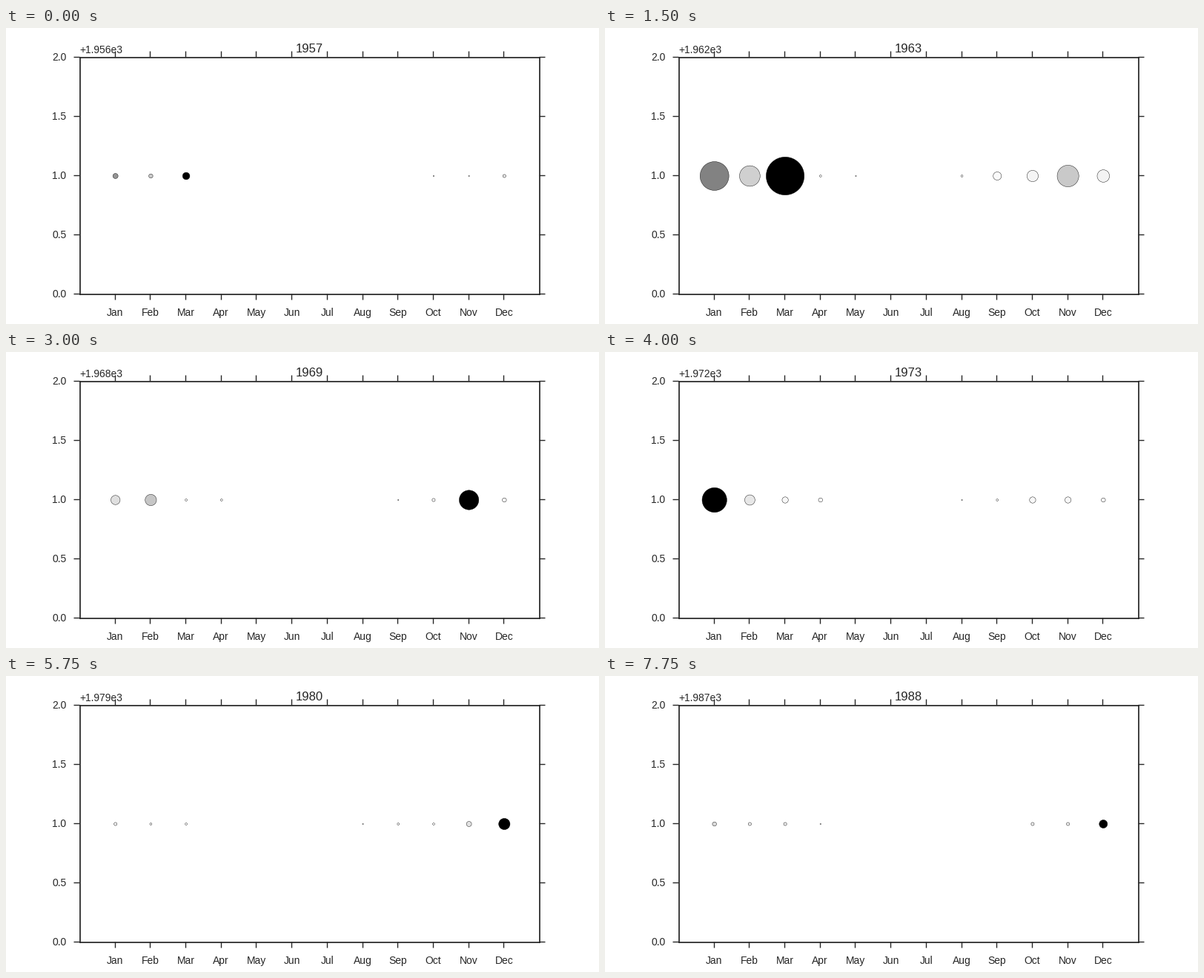
Recreate the animation shown at these times as a matplotlib script. Size 800 by 400 pixels, loop 8 s.

```python
import numpy as np
import matplotlib.pyplot as plt
from matplotlib.animation import FuncAnimation
from matplotlib.transforms import ScaledTranslation

W, H, DPI = 800, 400, 100
START, YEARS, STEP = 1957, 32, 250
INK = "0.15"
MONTHS = "Jan Feb Mar Apr May Jun Jul Aug Sep Oct Nov Dec".split()

# Key years: largest marker and its month, counted from January
KEY_YEARS, KEY_SIZES, KEY_MONTHS = zip(
    (1957, 7, 2), (1961, 18, 3), (1964, 46, 2), (1965, 27, 2),
    (1969, 19, -2), (1973, 24, 0), (1976, 27, -2), (1979, 31, -2),
    (1980, 11, -1), (1984, 27, -2), (1987, 8, -1))

plt.rcParams.update({
    "font.family": "Liberation Sans",
    "font.size": 10,
    "text.color": INK,
    "axes.edgecolor": INK,
    "axes.linewidth": 1.25,
})


def diameters(year):
    """Marker diameters in points: large in winter, none in midsummer."""
    rng = np.random.default_rng(year)
    peak = round(np.interp(year, KEY_YEARS, KEY_SIZES))
    month = round(np.interp(year, KEY_YEARS, KEY_MONTHS))
    season = 0.5 + 0.5 * np.cos(2 * np.pi * (np.arange(12) + 0.5) / 12)
    d = (peak * season * rng.uniform(0.15, 0.85, 12)).astype(int)
    d[month] = peak
    return d


def nudge(artist, dx, dy):
    """Move an artist by pixels, right and up."""
    shift = ScaledTranslation(dx / DPI, dy / DPI, fig.dpi_scale_trans)
    artist.set_transform(artist.get_transform() + shift)


def caption(x, y, **style):
    return fig.text(x / W, 1 - y / H, "", va="baseline", **style)


fig = plt.figure(figsize=(W / DPI, H / DPI), dpi=DPI, facecolor="white")
ax = fig.add_axes([0.125, 0.1, 0.775, 0.8])
ax.set(xlim=(0, 13), ylim=(0, 2))
ax.set_xticks(range(1, 13), MONTHS)
ax.set_yticks(np.arange(0, 2.1, 0.5))
ax.tick_params(length=6, width=1, pad=7, color=INK, labelcolor=INK,
               top=True, right=True)

# Pixel alignment of ticks and their labels
for axis, label_shift in (ax.xaxis, (-0.5, 0)), (ax.yaxis, (-0.5, 1)):
    for tick in axis.get_major_ticks():
        nudge(tick.tick1line, -1, 1)
        nudge(tick.tick2line, -1, 1)
        nudge(tick.label1, *label_shift)

title = caption(409, 33, size=12, ha="center")
offset = caption(99, 34, ha="left")
dots = ax.scatter([1], [1], s=[1], c=[1], cmap="Greys",
                  edgecolors="black", linewidths=0.3)


def draw(i):
    year = START + i
    d = diameters(year)
    months = np.flatnonzero(d)
    area = d[months] ** 2
    dots.set_offsets(np.column_stack([months + 1, np.ones(len(months))]))
    dots.set_sizes(area)
    dots.set_array(area)
    dots.set_clim(area.min(), area.max())
    title.set_text(str(year))
    offset.set_text(f"+{(year - 1) / 1000:g}e3")
    return dots, title, offset


anim = FuncAnimation(fig, draw, frames=YEARS, interval=STEP,
                     repeat=True, repeat_delay=0)
plt.show()
```
